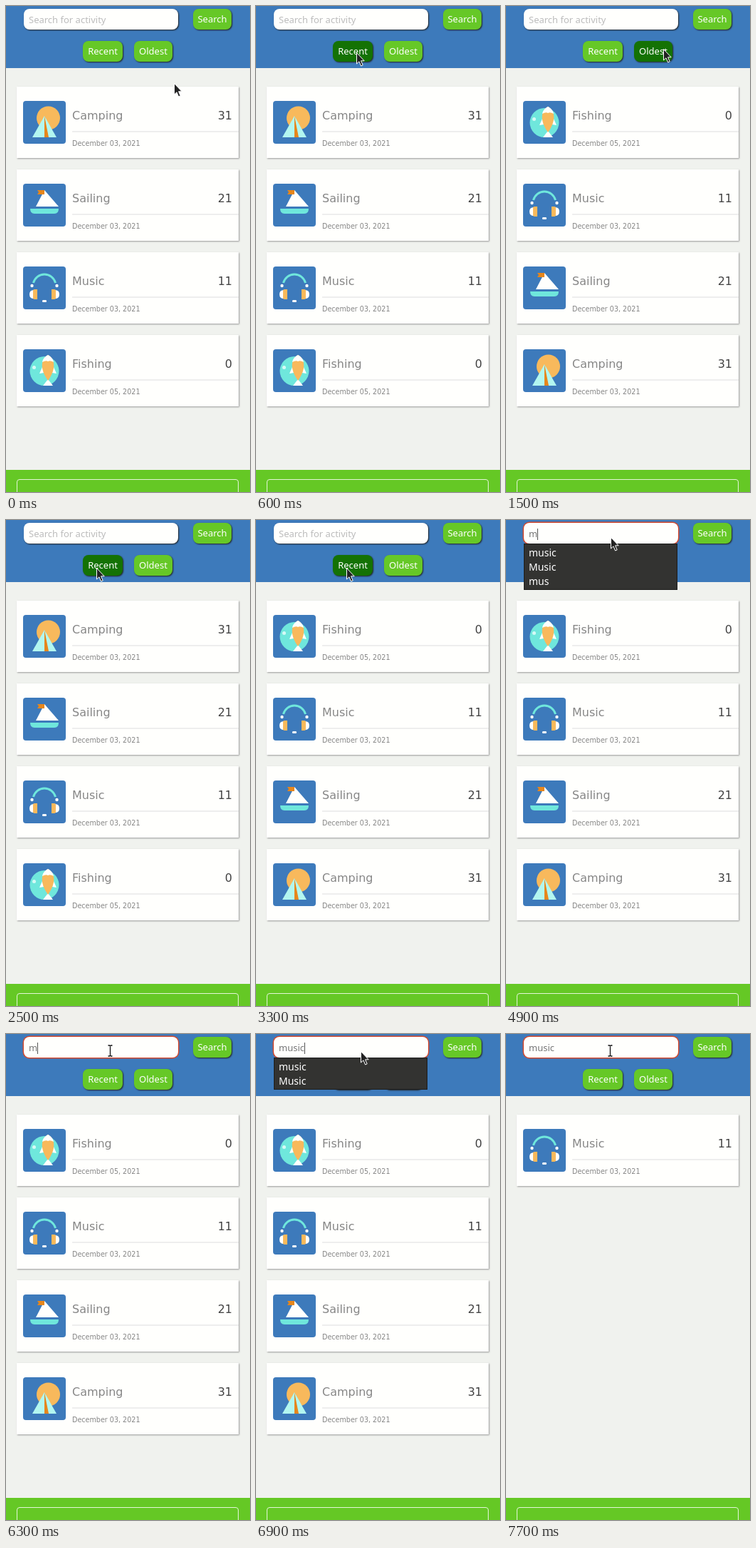
Animation of 343x681 px, one loop 8 s. Source, as an HTML page:

```html
<!DOCTYPE html>
<html lang="en">
<head>
<meta charset="utf-8">
<title>Activity list</title>
<style>
  html, body { margin: 0; width: 100%; height: 100%; overflow: hidden; }
  body { position: relative; background: #f0f2ee; font: 16px "DejaVu Sans", sans-serif; }
  body > *, .btn, .card > * { position: absolute; box-sizing: border-box; white-space: pre; }
  header { left: 0; top: 0; width: 343px; height: 87px; background: #3d7abb; }
  footer { left: 0; top: 650px; width: 343px; height: 31px; background: #65c825; overflow: hidden; }
  footer::before { content: ""; position: absolute; left: 15px; top: 13px; width: 310px; height: 40px;
    border: 1px solid #e4f6d8; border-radius: 4px; }
  .btn, #field, #menu { font-family: "Noto Sans", "Open Sans", sans-serif; }
  .btn { height: 29px; line-height: 29px; border-radius: 8px; background: #66c827; color: #fff;
    font-size: 13px; text-align: center; box-shadow: 1px 1px 2px #222; }
  .btn.hot { background: #147204; }
  #field { left: 25px; top: 4px; width: 217px; height: 29px; padding-left: 7px; border-radius: 8px;
    background: #fffffd; color: #777; font-size: 13px; line-height: 30px; box-shadow: 1px 1px 2px #222; }
  #field.focus { box-shadow: 0 0 0 1.5px #d2492f; }
  #caret { display: inline-block; width: 1px; height: 16px; margin-right: -1px; background: #555; vertical-align: -4px; }
  #hint { color: #bcbcbc; }
  #menu { left: 25px; top: 33px; width: 216px; padding: 2px 6px 1px; border: 1px solid #1c1c1b; background: #333331;
    color: #fff; font-size: 14px; line-height: 20px; }
  #list { left: 15px; top: 113px; width: 312px; display: flex; flex-direction: column; gap: 16px; }
  .card { position: relative; height: 100px; background: #fffffd; box-shadow: 1px 1px 2px #999; }
  .card svg { left: 9px; top: 20px; border-radius: 4px; background: #3d7abb; }
  .name, .count { top: 31px; line-height: 20px; }
  .name { left: 78px; color: #868686; }
  .count { right: 9px; color: #444; }
  .card hr { left: 78px; right: 0; top: 62px; height: 2px; margin: 0; border: 0; background: #eee; }
  .date { left: 78px; top: 74px; font-size: 9.6px; line-height: 12px; color: #868686; }
  #pointer { left: 0; top: 0; overflow: visible; }
</style>
</head>
<body>
<header>
  <div class="btn" style="left:263px;top:4px;width:54px">Search</div>
  <div class="btn" id="recent" style="left:108px;top:49px;width:56px">Recent</div>
  <div class="btn" id="oldest" style="left:180px;top:49px;width:54px">Oldest</div>
</header>
<div id="field"><span id="typed"></span><i id="caret"></i><span id="hint">Search for activity</span></div>
<div id="list"></div>
<footer></footer>
<div id="menu"></div>
<svg id="pointer" width="14" height="22">
  <path id="arrow" d="M.5 .5V16L4 12.8 6.6 19 9.2 17.9 6.6 11.8H11.2Z" fill="#222" stroke="#fff"/>
  <g id="beam" fill="none">
    <path d="M-3 -7.5H3M-3 7.5H3M0 -7.5V7.5" stroke="#fff" stroke-width="3"/>
    <path d="M-3 -7.5H-1L0 -6.5 1 -7.5H3M-3 7.5H-1L0 6.5 1 7.5H3M0 -7V7" stroke="#111" stroke-width="1.3"/>
  </g>
</svg>
<script>
const $ = id => document.getElementById(id);
const shape = (fill, d) => `<path fill="${fill}" d="${d}"/>`;
const dot = (fill, x, y, r) => `<circle fill="${fill}" cx="${x}" cy="${y}" r="${r}"/>`;
const WHITE = '#fffffd', TEAL = '#6fe7dc', PALE = '#b2f6f0', SAND = '#f8b95c', ORANGE = '#e6861c';

const tent = dot(SAND, 35.5, 24, 16.5) + shape(PALE, 'M13 51L30 21 47 51Z') + shape(ORANGE, 'M30 21V51H36Z');
const boat = shape(WHITE, 'M30 9L50 32H18Z') + shape(ORANGE, 'M20 9H30V15H20L22 12Z') +
  shape(TEAL, 'M10 35H50Q50 42 44 42H16Q10 42 10 35Z');
const phones = `<path d="M14.5 23A16 16 0 0 1 45.5 23" fill="none" stroke="${TEAL}" stroke-width="3"/>` +
  dot(WHITE, 12.5, 27, 2.2) + dot(WHITE, 47.5, 27, 2.2) +
  shape(WHITE, 'M15 33Q9 33 9 39T15 45ZM45 33Q51 33 51 39T45 45Z') +
  shape(SAND, 'M16 32H20V46H16Q14 46 14 44V34Q14 32 16 32ZM40 32H44Q46 32 46 34V44Q46 46 44 46H40Z') +
  shape(WHITE, 'M28 47H32Q33 47 33 48.5T32 50H28Q27 50 27 48.5T28 47Z');
const fish = dot(TEAL, 30, 30.5, 20.5) + dot('#d5faf6', 15.5, 25.5, 2.5) +
  shape(WHITE, 'M27 25L23 34 29 33ZM43 25L47 34 41 33ZM35 42L28 51H42Z') +
  shape(SAND, 'M35 8C46 14 46 29 35 44 24 29 24 14 35 8Z') +
  shape(WHITE, 'M35 8C39 10 42 13 43 18Q38 15 35 17 32 15 27 18C28 13 31 10 35 8Z');

const items = [['Camping', 31, '03', tent], ['Sailing', 21, '03', boat], ['Music', 11, '03', phones], ['Fishing', 0, '05', fish]];
$('list').innerHTML = items.map(([name, count, day, icon]) =>
  `<div class="card"><svg width="60" height="60">${icon}</svg><div class="name">${name}</div>` +
  `<div class="count">${count}</div><hr><div class="date">December ${day}, 2021</div></div>`).join('');
const cards = [...$('list').children];

// Timelines: [start in ms, value...]; each value holds until the next.
const LOOP = 8000;
const moves = [[0, 236, 108], [200, 229, 102], [300, 205, 88], [400, 173, 74], [500, 150, 66], [600, 141, 65],
  [1200, 163, 63], [1300, 190, 61], [1400, 212, 60], [1500, 221, 60], [2200, 192, 61], [2300, 157, 64],
  [2500, 127, 67], [3500, 133, 64], [3700, 227, 17], [3900, 165, 23], [4000, 146.5, 23.5]];
const kinds = [[0, 'arrow'], [3900, 'beam'], [4900, 'arrow'], [5100, 'beam'], [6600, 'arrow'], [7500, 'beam']];
const hovers = [[0, ''], [500, 'recent'], [1200, ''], [1400, 'oldest'], [2200, ''], [2500, 'recent'], [3500, '']];
const orders = [[0, 'column'], [1100, 'column-reverse'], [2100, 'column'], [3300, 'column-reverse']];
const typing = [[0, ''], [4800, 'm'], [5000, 'mu'], [5100, 'muc'], [5500, 'mucs'], [6000, 'muc'], [6100, 'mu'],
  [6300, 'm'], [6500, 'mu'], [6700, 'mus'], [6800, 'musi'], [6900, 'music']];
const menus = [[0, false], [4900, true], [5100, false], [6600, true], [7500, false]];

const at = (line, t) => line.findLast(step => step[0] <= t).slice(1);
const show = (el, on) => { el.style.display = on ? '' : 'none'; };

function draw(t) {
  const [x, y] = at(moves, t), [kind] = at(kinds, t), [hover] = at(hovers, t), [text] = at(typing, t);
  const [open] = at(menus, t);
  // The open menu turns the text cursor into an arrow.
  const offset = kind === 'arrow' && t >= 4000 ? .5 : 0;
  $('pointer').style.transform = `translate(${x + offset}px, ${y + offset}px)`;
  for (const id of ['arrow', 'beam']) show($(id), id === kind);
  for (const id of ['recent', 'oldest']) $(id).classList.toggle('hot', id === hover);
  $('list').style.flexDirection = at(orders, t)[0];
  cards.forEach((card, i) => show(card, t < 7600 || items[i][0] === 'Music'));
  $('field').classList.toggle('focus', t >= 4000);
  $('typed').textContent = text;
  show($('hint'), !text);
  show($('caret'), t >= 4000 && t < 7700);
  show($('menu'), open);
  $('menu').textContent = ['music', 'Music', 'mus'].filter(s => s.toLowerCase().startsWith(text)).join('\n');
}

const start = performance.now();
function tick() {
  draw((performance.now() - start) % LOOP);
  requestAnimationFrame(tick);
}
tick();
</script>
</body>
</html>
```
